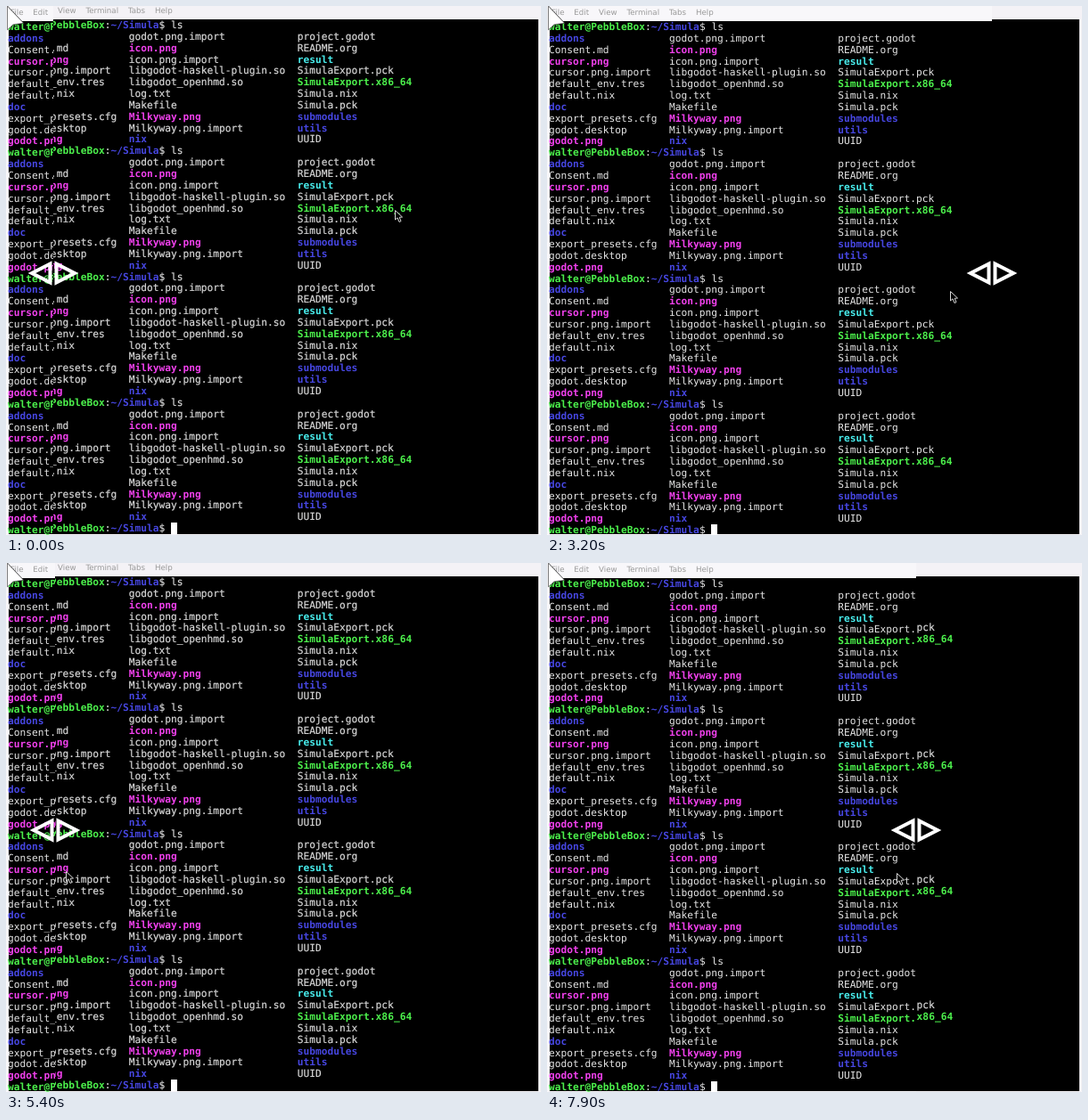
An HTML page with a canvas that plays this animation: 600 by 594 pixels, repeating every 8 s.

```html
<!DOCTYPE html>
<html lang="en">
<head>
<meta charset="utf-8">
<title>Terminal comparison slider</title>
<style>
html, body { margin: 0; width: 100%; height: 100%; overflow: hidden; background: #f4f2f6; }
#stage { position: relative; width: 600px; height: 594px; overflow: hidden; }
.shot { position: absolute; inset: 0; background: #f4f2f6; overflow: hidden; }
.screen { position: absolute; inset: 15px 3px 1px; background: #000; }
.menu {
  position: absolute; left: 5px; top: 0; display: flex; gap: 10.8px; color: #999;
  font: 8.7px/12px "DejaVu Sans", sans-serif; text-rendering: geometricPrecision;
}
pre {
  position: absolute; left: 2.6px; top: 16px; margin: 0; color: #d8d8d8;
  font: 11.23px/12.85px "DejaVu Sans Mono", monospace;
  text-rendering: geometricPrecision; -webkit-text-stroke: .2px;
}
.thin { background: #f8f7fa; }
.thin .screen { top: 17px; }
.thin .menu { top: 2px; }
.thin pre { left: 2px; top: 18px; color: #e6e6e6; -webkit-text-stroke: 0; }
b { font-weight: bold; -webkit-text-stroke: 0; }
.green { color: #4cf04c; }
.blue { color: #4646e0; }
.pink { color: #f040ec; }
.cyan { color: #48ecec; }
.block { background: #fff; }
canvas { position: absolute; left: 0; top: 0; }
</style>
</head>
<body>
<div id="stage">
  <div class="shot"></div>
  <div class="shot thin"></div>
  <canvas width="600" height="594"></canvas>
</div>
<script>
const rows = [
  "addons godot.png.import project.godot",
  "Consent.md icon.png README.org",
  "cursor.png icon.png.import result",
  "cursor.png.import libgodot-haskell-plugin.so SimulaExport.pck",
  "default_env.tres libgodot_openhmd.so SimulaExport.x86_64",
  "default.nix log.txt Simula.nix",
  "doc Makefile Simula.pck",
  "export_presets.cfg Milkyway.png submodules",
  "godot.desktop Milkyway.png.import utils",
  "godot.png nix UUID"
];
const kinds = [
  [/\.png$/, "pink"],
  [/^(addons|doc|nix|submodules|utils)$/, "blue"],
  [/^result$/, "cyan"],
  [/x86_64$/, "green"]
];

const paint = (text, kind) => `<b class="${kind}">${text}</b>`;
const prompt = paint("walter@PebbleBox", "green") + ":" + paint("~/Simula", "blue") + "$ ";

function cell(name, col) {
  const kind = kinds.find(([re]) => re.test(name));
  return (kind ? paint(name, kind[1]) : name) + " ".repeat([20, 28, name.length][col] - name.length);
}

const listing = rows.map(row => row.split(" ").map(cell).join("")).join("\n");
const session = (prompt + "ls\n" + listing + "\n").repeat(4) + prompt + '<span class="block"> </span>';
const menu = "File Edit View Terminal Tabs Help".replace(/\w+/g, "<span>$&</span>");

for (const shot of document.querySelectorAll(".shot"))
  shot.innerHTML = `<div class="screen"></div><div class="menu">${menu}</div><pre>${session}</pre>`;

const thin = document.querySelector(".thin");
const ctx = document.querySelector("canvas").getContext("2d");

// Key points as [time, value]
const sweep = [
  [0, 53], [800, 58], [1900, 317], [2850, 555], [3100, 540], [3200, 499], [3500, 345],
  [4600, 15], [4900, 14], [5400, 55], [6500, 329], [7300, 479], [7900, 414], [8100, 374]
];
const height = [[0, 230], [900, 303], [3200, 321], [4600, 345], [8100, 349]];
const LEAD = 90; // the divider trails the pointer

const slope = ([t0, a], [t1, b]) => (b - a) / (t1 - t0);

// Monotone tangent: flat at the ends and turning points
function tangent(keys, i) {
  if (i === 0 || i === keys.length - 1) return 0;
  const a = slope(keys[i - 1], keys[i]), b = slope(keys[i], keys[i + 1]);
  return a * b <= 0 ? 0 : 2 * a * b / (a + b);
}

function curve(keys, time) {
  const i = keys.findIndex(([t]) => t > time) - 1;
  const [t0, a] = keys[i], [t1, b] = keys[i + 1];
  const d = t1 - t0, u = (time - t0) / d, v = 1 - u;
  return v * v * ((1 + 2 * u) * a + u * d * tangent(keys, i))
    + u * u * ((1 + 2 * v) * b - v * d * tangent(keys, i + 1));
}

function shape(x, y, points) {
  ctx.beginPath();
  for (const [dx, dy] of points) ctx.lineTo(x + dx, y + dy);
  ctx.closePath();
}

function outline(color, width) {
  ctx.strokeStyle = color;
  ctx.lineWidth = width;
  ctx.stroke();
}

function fill(color) {
  ctx.fillStyle = color;
  ctx.fill();
}

function drawHandle(x) {
  for (const side of [-1, 1]) {
    shape(x, 300, [[side * 24, 0], [side * 3.5, -10.5], [side * 3.5, 10.5]]);
    outline("#fff", 4);
  }
}

function drawPointer(x, y) {
  shape(x - 0.5, y - 0.5, [[0, 0], [0, 10.5], [2.5, 8.3], [4.5, 13], [6.5, 12], [4.7, 7.8], [8, 7.5]]);
  fill("#000");
  outline("#d8d8d8", 1);
}

function drawCorner() {
  shape(2, 1, [[0, 0], [0, 25], [6, 19.5], [17, 18]]);
  outline("#444", 1.4);
  fill("#fff");
}

function frame(now) {
  const time = Math.floor(now % 8000 / 100) * 100;
  const x = Math.round(curve(sweep, time));
  // The pointer first glides in to pick up the divider
  const away = 384 * Math.max(0, 1 - time / 800) ** 2;
  thin.style.clipPath = `inset(0 ${600 - x}px 0 0)`;
  ctx.clearRect(0, 0, 600, 594);
  drawCorner();
  drawHandle(x);
  drawPointer(Math.round(curve(sweep, time + LEAD) + away), Math.round(curve(height, time)));
}

const start = performance.now();
function loop() {
  frame(performance.now() - start);
  requestAnimationFrame(loop);
}
loop();
</script>
</body>
</html>
```
